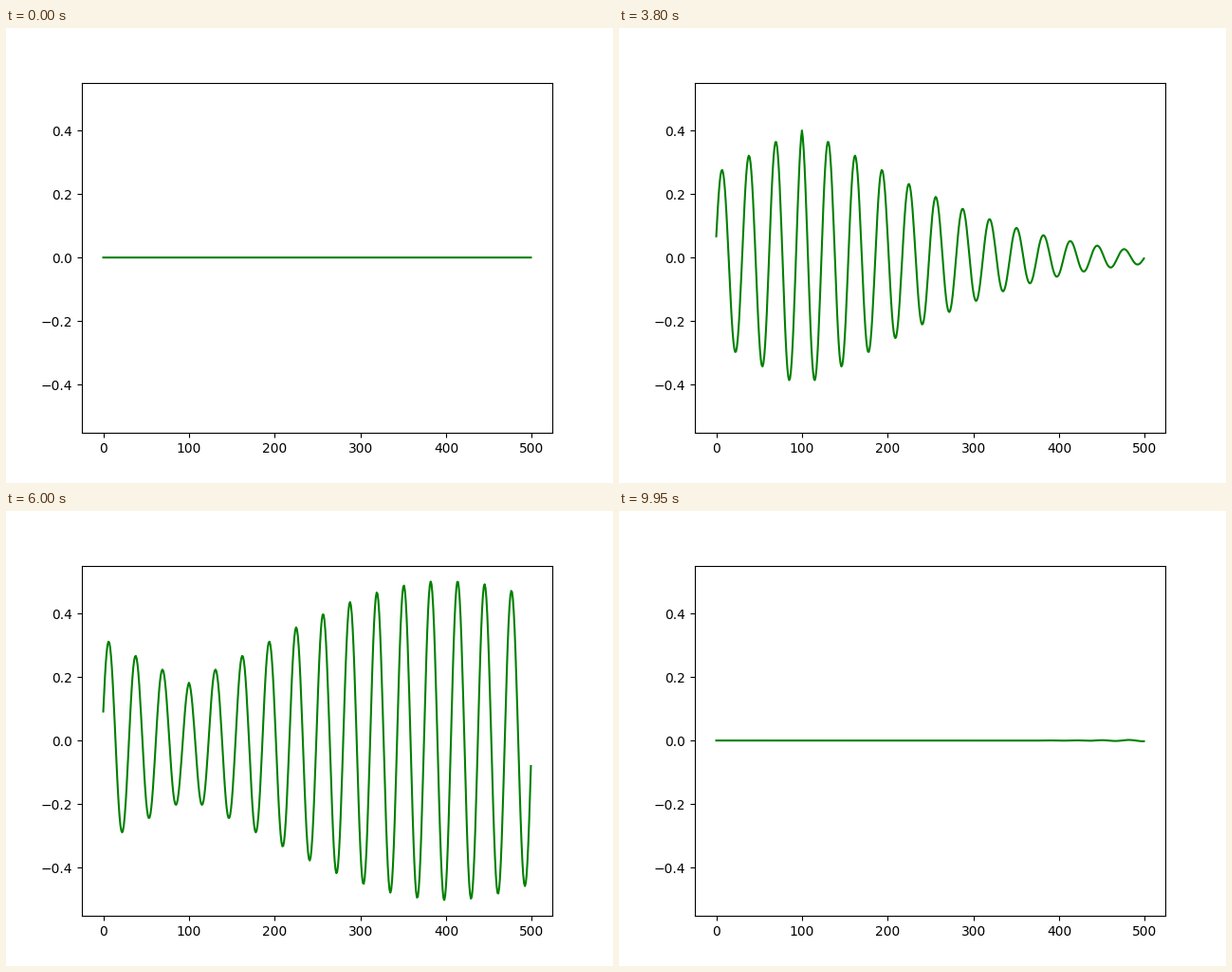
A matplotlib script for the animation above (10 s loop, 640 by 480 pixels).

```python
import numpy as np
import matplotlib.pyplot as plt
from matplotlib.animation import FuncAnimation

CELLS = 500
SOURCE = 100
FRAMES = 200
CELLS_PER_FRAME = 10

OMEGA = 0.2       # radians per step
CENTER = 900      # step at which the pulse peaks
WIDTH = 300       # Gaussian width in steps
AMPLITUDE = 0.5 / np.cos(OMEGA / 2)

cells = np.arange(CELLS)


def field(frame):
    """Gaussian wave packet leaving the source cell in both directions."""
    step = CELLS_PER_FRAME * frame + 1 - np.abs(cells - SOURCE)
    envelope = AMPLITUDE * np.exp(-((step - CENTER) / WIDTH) ** 2)
    return np.where(step > 0, envelope * np.sin(OMEGA * step), 0.0)


waves = np.array([field(frame) for frame in range(FRAMES)])

fig, ax = plt.subplots(figsize=(6.4, 4.8), dpi=100)
line, = ax.plot(cells, waves[0], color="green", linewidth=1.5)
low, high = waves.min(), waves.max()
margin = 0.05 * (high - low)
ax.set_ylim(low - margin, high + margin)


def update(frame):
    line.set_ydata(waves[frame])
    return line,


animation = FuncAnimation(fig, update, frames=FRAMES, interval=50,
                          repeat=True, repeat_delay=0)
plt.show()
```
